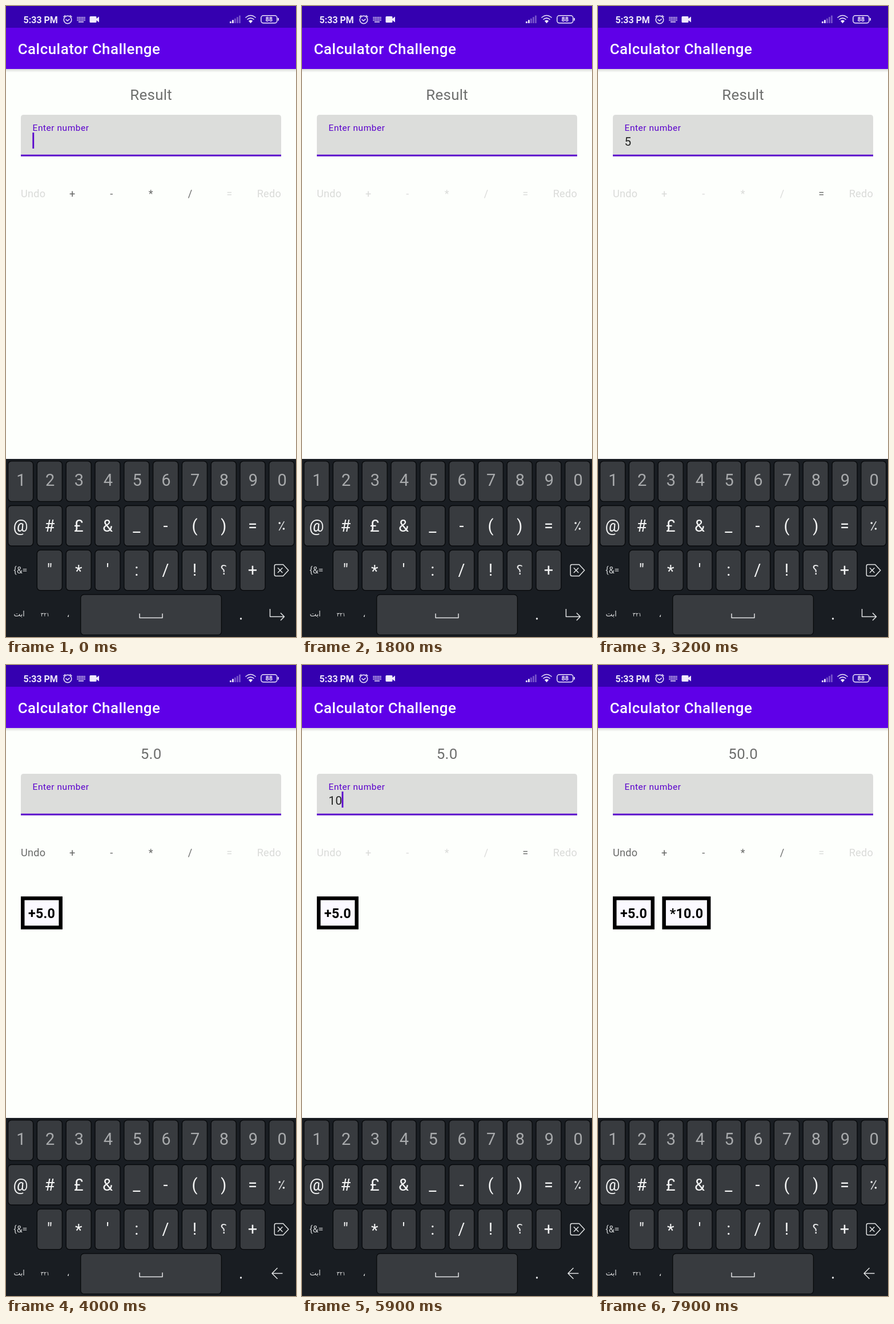
An HTML page for the animation above (8000 ms loop, 508 px wide and 1102 px high).

```html
<!DOCTYPE html>
<html lang="en">
<head>
<meta charset="utf-8">
<title>Calculator Challenge</title>
<style>
  html, body { margin: 0; width: 100%; height: 100%; overflow: hidden; background: #fdfffc; }
  svg { display: block; width: 508px; height: 1102px; font-family: Roboto, "Noto Sans", sans-serif; }
  .mid { text-anchor: middle; }
  .result { font-size: 25.9px; letter-spacing: .3px; fill: #6e6f6e; }
  .op { font-size: 18.1px; letter-spacing: .3px; fill: #dadbd9; }
  .op.on { fill: #6a6b6a; }
  .chip rect { fill: #fbf9ff; stroke: #000; stroke-width: 6.5; }
  .chip text { font-size: 23.3px; font-weight: 700; letter-spacing: .2px; }
  .key { fill: #383b3f; stroke: #07090b; stroke-width: 1.3; }
  .key.down { fill: #54585d; }
  .sym { font-size: 29px; fill: #f4f5f5; }
  .dim { fill: #a8aaac; }
  .arabic { font-family: "DejaVu Sans", sans-serif; fill: #e6e7e8; }
  .line { fill: none; stroke: #e2e4e5; stroke-width: 1.5; stroke-linejoin: round; }
  .white { fill: none; stroke: #f0eafc; stroke-width: 1.5; }
  .solid { fill: #f0eafc; }
</style>
</head>
<body>
<svg viewBox="0 0 508 1102">
  <defs>
    <linearGradient id="shade" x2="0" y2="1">
      <stop stop-color="#000" stop-opacity=".15"/>
      <stop offset="1" stop-color="#000" stop-opacity="0"/>
    </linearGradient>
  </defs>
  <rect width="508" height="1102" fill="#fdfffc"/>
  <rect y="110" width="508" height="6" fill="url(#shade)"/>
  <rect width="508" height="110" fill="#5f00e8"/>
  <rect width="508" height="38" fill="#3500b0"/>

  <g id="status">
    <text class="solid" x="30.5" y="29.6" font-size="16" font-weight="700">5:33 PM</text>
    <circle class="white" cx="108" cy="24" r="6.8"/>
    <path class="white" d="M104.6 23.2l3 2.8 4-3.4M100.6 19.2l3.4-3M115.4 19.2l-3.4-3"/>
    <g id="dots"></g>
    <path class="solid" d="M127 27h9v1.6h-9zM148 18h9q1.5 0 1.5 1.5v2.6l4.5-3.6v10l-4.5-3.6v2.6q0 1.5-1.5 1.5h-9q-1.500 0-1.500-1.500v-8q0-1.500 1.500-1.500z"/>
    <g id="bars"></g>
    <path class="white" stroke-width="2" d="M419.500 20.500q9-8 18 0M422.500 23.800q6-5.300 12 0"/>
    <path class="solid" d="M424.800 26q3.700-3 7.400 0l-3.700 4.300z"/>
    <rect class="white" x="446.800" y="16.800" width="28" height="13" rx="4"/>
    <path class="solid" d="M476.200 21h1.800v4.500h-1.800z"/>
    <text class="solid mid" x="460.800" y="27.300" font-size="11" font-weight="700">88</text>
  </g>

  <text x="20.700" y="84.200" font-size="25.900" font-weight="500" letter-spacing=".48" fill="#fff">Calculator Challenge</text>
  <text id="result" class="result mid" x="254.200" y="164"></text>

  <path d="M26 262.500V195q0-5 5-5H477q5 0 5 5V262.500z" fill="#dcdddb"/>
  <rect x="26" y="259.600" width="456" height="2.900" fill="#5800cc"/>
  <text x="46.600" y="217.600" font-size="15.520" letter-spacing=".52" fill="#5a00cc">Enter number</text>
  <text id="input" x="46.600" y="244" font-size="20.700" letter-spacing=".2" fill="#222322"></text>
  <rect id="caret" y="221" width="2.800" height="28" fill="#5800cc"/>

  <g id="ops"></g>
  <g id="chips"></g>

  <rect y="791" width="508" height="311" fill="#191d22"/>
  <g id="keys"></g>
  <text class="mid dim" x="25.300" y="990.500" font-size="16" style="fill:#c9cbcd">{&amp;=</text>
  <path class="line" d="M470.300 978q0-2.500 2.500-2.500H485.500L494.800 985.500 485.500 995.500H472.800q-2.500 0-2.500-2.500zM476 981.300l8.400 8.400M484.400 981.300l-8.400 8.400"/>
  <g class="arabic mid">
    <text x="23" y="1065.500" font-size="12.500">ابت</text>
    <text x="68.500" y="1066" font-size="9.500">۳۲۱</text>
    <text x="109" y="1067" font-size="15">،</text>
  </g>
  <path class="line" d="M234 1061V1068.500H274V1061"/>
  <circle cx="411.500" cy="1070" r="1.700" fill="#e6e7e8"/>
  <path id="enter" class="line"/>
</svg>
<script>
const LOOP = 8000;
const $ = id => document.getElementById(id);

function add(parent, tag, attrs, text) {
  const el = document.createElementNS("http://www.w3.org/2000/svg", tag);
  for (const name in attrs) el.setAttribute(name, attrs[name]);
  if (text !== undefined) el.textContent = text;
  parent.appendChild(el);
  return el;
}

// status icons
for (let row = 0; row < 3; row++)
  for (let col = 0; col < 6; col++)
    add($("dots"), "rect", { class: "solid", x: 124.5 + col * 2.5, y: 19 + row * 2.6, width: 1.6, height: 1.6 });
for (let i = 0; i < 5; i++) {
  const h = 3 + i * 2.6;
  add($("bars"), "rect", { class: "solid", x: 392 + i * 4, y: 30 - h, width: 2.8, height: h, opacity: i < 2 ? 1 : .35 });
}

// operator row
const ops = {};
["Undo", "+", "-", "*", "/", "=", "Redo"].forEach((name, i) => {
  const x = i === 0 ? 25.9 : i === 6 ? 482.1 : 47.4 + i * 68.8;
  const anchor = i === 0 ? "start" : i === 6 ? "end" : "middle";
  ops[name] = add($("ops"), "text", { class: "op", x, y: 334, "text-anchor": anchor }, name);
});

// history chips
const chips = [["+5.0", 26, 73], ["*10.0", 112.4, 85]].map(([label, x, w]) => {
  const g = add($("chips"), "g", { class: "chip" });
  add(g, "rect", { x: x + 3.25, y: 407.45, width: w - 6.5, height: 51 });
  add(g, "text", { class: "mid", x: x + w / 2 + .1, y: 442.4 }, label);
  return g;
});

// keyboard
const keys = {};
const keyBox = (x, y, width) => add($("keys"), "rect", { class: "key", x, y, width, height: 70.5, rx: 6 });
["1234567890", "@#£&_-()=٪", " \"*':/!؟+"].forEach((row, r) => {
  [...row].forEach((ch, i) => {
    if (ch === " ") return;
    const cx = 25.6 + i * 50.8, top = 794.8 + r * 77.7;
    const box = keyBox(cx - 22, top, 44);
    if (r === 0) keys[ch] = box;
    if (ch === "٪") {
      add($("keys"), "path", { class: "line", d: `M${cx - 4.5} 916L${cx + 4.5} 900` });
      for (const s of [-1, 1])
        add($("keys"), "circle", { cx: cx + s * 3.6, cy: 908 + s * 5, r: 1.8, fill: "#f4f5f5" });
    } else if (ch === "؟") {
      add($("keys"), "text", { class: "arabic mid", x: cx, y: 993, "font-size": 23 }, ch);
    } else {
      const y = r === 0 ? 838.3 : r === 1 ? 918.3 : ch === "*" ? 997 : 995;
      add($("keys"), "text", { class: "sym mid" + (r ? "" : " dim"), x: cx + (r ? 0 : .8), y }, ch);
    }
  });
});
keyBox(130.8, 1027.9, 246.6);

// app state from each moment on
const IDLE = "+-*/";
const steps = [
  { at: 0, result: "Result", input: "", on: IDLE, chips: 0 },
  { at: 1000, on: "" },
  { at: 2200, input: "5", on: "=" },
  { at: 3500, result: "5.0", input: "", on: IDLE + "Undo", chips: 1 },
  { at: 4500, on: "" },
  { at: 5300, input: "1", on: "=" },
  { at: 5500, input: "10" },
  { at: 6400, result: "50.0", input: "", on: IDLE + "Undo", chips: 2 }
];
const caretOn = [[0, 500], [1000, 1500], [2000, 2700], [3300, 4000], [4500, 5000], [5300, 6000], [6400, 6900], [7400, 7900]];
const presses = [["5", 2100, 2200], ["0", 5400, 5500]];
const RETURN = "M462.500 1053V1066.500H487.500M481 1060l6.500 6.500-6.500 6.500";
const BACK = "M484.500 1062.500H466M475.500 1053l-9.500 9.500 9.500 9.500";

const within = (t, from, to) => t >= from && t < to;

function draw(t) {
  const now = Object.assign({}, ...steps.filter(s => s.at <= t));
  $("result").textContent = now.result;
  $("input").textContent = now.input;
  for (const name in ops) ops[name].classList.toggle("on", now.on.includes(name));
  chips.forEach((chip, i) => chip.style.display = i < now.chips ? "" : "none");
  $("caret").setAttribute("x", 46.4 + now.input.length * 11.6);
  $("caret").style.display = caretOn.some(([a, b]) => within(t, a, b)) ? "" : "none";
  $("enter").setAttribute("d", now.chips ? BACK : RETURN);
  for (const [key, a, b] of presses) keys[key].classList.toggle("down", within(t, a, b));
}

const start = performance.now();
function tick() {
  draw((performance.now() - start) % LOOP);
  requestAnimationFrame(tick);
}
tick();
</script>
</body>
</html>
```
